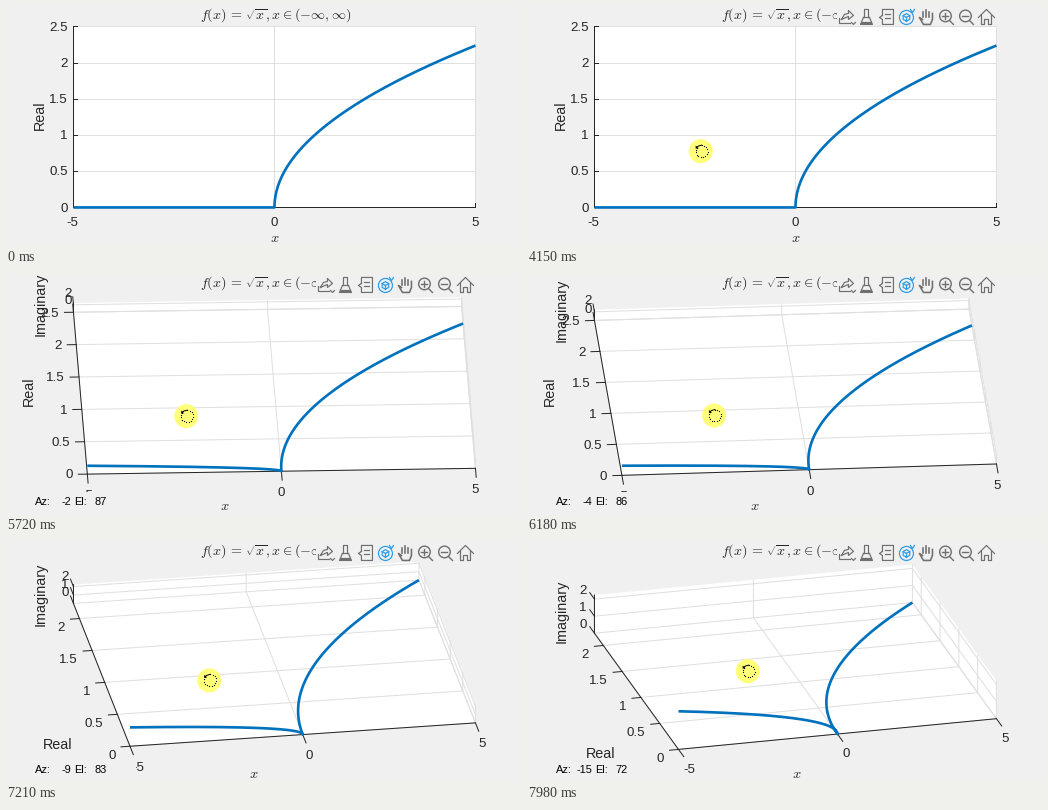
These frames come from a looping animation (515 by 240 pixels, 8 s). A matplotlib script:

```python
import numpy as np
import matplotlib.pyplot as plt
from matplotlib.animation import FuncAnimation
from matplotlib.collections import LineCollection
from matplotlib.patches import Circle, Polygon, Rectangle

W, H = 515, 240
INTERVAL, FRAMES = 40, 200
PX = 0.72                       # points per pixel at 100 dpi
LEFT, SPAN = 67, 402
BG, INK, GRID, BLUE = "#f0f0f0", "#262626", "#dfdfdf", "#0072bd"
ICON, ACTIVE = "#6f6f6f", "#2b9bea"
TICK, LABEL, SMALL = 13.33, 14.4, 11

# The picture refreshes at a slower beat than the animation runs
ENTER, PRESS, READOUT, BEAT = 440, 4150, 4270, 114.24
GRIP = np.array([174.5, 145])   # where the drag begins
MOUSE = np.array([
    (440, 290, 227), (1230, 224, 136), (1810, *GRIP), (5400, *GRIP),
    (5695, 181, 142), (6837, 198, 140.5), (7523, 210, 136), (7980, 221.5, 129)])

U = np.linspace(-1, 1, 241)
CURVE_X = 5 * U * np.abs(U)
ROOT = np.sqrt(CURVE_X + 0j)

plt.rcParams["font.family"] = "Liberation Sans"
plt.rcParams["mathtext.fontset"] = "cm"

fig = plt.figure(figsize=(W / 100, H / 100), dpi=100, facecolor=BG)
ax = fig.add_axes([0, 0, 1, 1])
EDGE = 0.45                     # just under half, so lines snap to whole pixels
ax.set_xlim(-EDGE, W - EDGE)
ax.set_ylim(H - EDGE, -EDGE)
ax.axis("off")


def text(x, y, s, size=TICK, ha="center", color=INK, z=3, drop=0.31):
    """Text whose capitals are centred vertically on y."""
    ax.text(x - 0.6, y + drop * size, s, fontsize=size * PX, ha=ha,
            va="baseline", color=color, zorder=z)


def upright(x, y, s):
    ax.text(x + 0.3 * LABEL, y - 1.5, s, fontsize=LABEL * PX, ha="center",
            va="baseline", rotation=90, rotation_mode="anchor", color=INK, zorder=3)


def line(points, color=INK, width=1, z=1.8, **kw):
    xs, ys = zip(*points)
    ax.plot(xs, ys, color=color, lw=width * PX, zorder=z, **kw)


def projector(az, el, bottom, height, lim):
    """Orthographic view of the unit box, stretched to fill the axes."""
    ca, sa = np.cos(np.radians(az)), np.sin(np.radians(az))
    ce, se = np.cos(np.radians(el)), np.sin(np.radians(el))
    wide, tall = ca - sa, se * (ca - sa) + ce

    def project(x, y, z):
        u, v, w = (x + 5) / 10, y / lim, z / lim
        across = (u * ca + v * sa - sa) / wide
        up = (-u * se * sa + v * se * ca + w * ce) / tall
        return np.array([LEFT + SPAN * across, bottom - height * up])
    return project


def unit(v):
    return v / np.hypot(*v)


def draw_plot(az, el):
    turn = -az
    plane, slanted = turn == 0, turn > 6
    lim = 5 ** 0.5 if turn > 9 else 2.5
    bottom = 201 if plane else 198.5 + 0.57 * turn
    height = 181 if plane else 185 if slanted else 177
    p = projector(az, el, bottom, height, lim)
    xt = (-5, 0, 5)
    yt = np.arange(0, lim + 0.01, 0.5)
    zt = (0, 1, 2) if slanted else (0, 2)

    a, b, c = p(-5, 0, 0), p(5, 0, 0), p(-5, lim, 0)
    roof = p(-5, lim, lim)
    outline = [a, b, p(5, 0, lim), p(5, lim, lim), roof, c]
    ax.add_patch(Polygon(outline, fc="white", ec="none", zorder=1))

    grid = [[p(x, 0, 0), p(x, lim, 0), p(x, lim, lim)] for x in xt]
    grid += [[p(-5, y, 0), p(5, y, 0), p(5, y, lim)] for y in yt]
    if not plane:
        grid += [[p(-5, lim, z), p(5, lim, z), p(5, 0, z)] for z in zt]
    ax.add_collection(LineCollection(grid, colors=GRID, linewidths=PX, zorder=1.5))

    line([b, a, c] if plane else [b, a, c, roof])
    out_x, out_y = unit(a - c), unit(a - b)
    tick = -4 if plane else 9
    for x in xt:
        q = p(x, 0, 0)
        line([q, q + tick * out_x])
        end = q + (2 if plane else 9) * out_x
        text(end[0], end[1] + 12, f"{x}", ha="left" if slanted else "center")
    for y in yt:
        q = p(-5, y, 0)
        line([q, q + tick * out_y])
        end = q + (5 if plane else 14) * out_y
        text(end[0], end[1] + 7.5 * slanted, f"{y:g}", ha="right")
    if not plane:
        for z in zt:
            q = p(-5, lim, z)
            line([q, q - 8 * out_x])
            text(*(q - 12 * out_x), f"{z}", ha="right")
        upright(34, 25 + 3.05 * turn, "Imaginary")

    if slanted:
        text(15 + 4 * turn, 187 + 1.6 * turn, "Real", LABEL)
    else:
        upright(*((33, 110) if plane else (22, 118)), "Real")
    text(268.5 if plane else 211 + 3.95 * turn, 232, "$x$", LABEL, drop=0.22)
    ax.plot(*p(CURVE_X, ROOT.real, ROOT.imag), color=BLUE, lw=2.67 * PX,
            zorder=2, solid_joinstyle="round", solid_capstyle="butt")
    text(270, 7.4, r"$f(x)\,=\,\sqrt{x},x\in(-\infty,\infty)$", 14.1)


def draw_toolbar(alpha):
    ax.add_patch(Rectangle((309.5, -0.5), 160, 20, fc=BG, ec="none",
                           alpha=alpha, zorder=4))
    slots = iter(range(319, 470, 20))

    def icon(*strokes, rings=(), color=ICON, width=1.2):
        x0, y0 = next(slots), 11
        for points in strokes:
            line([(x0 + x, y0 + y) for x, y in points], color, width, 5, alpha=alpha)
        for x, y, r in rings:
            ax.add_patch(Circle((x0 + x, y0 + y), r, fill=False, ec=color,
                                lw=width * PX, alpha=alpha, zorder=5))

    # export, brush, data tip
    icon([(-7, 1), (-7, 6), (4, 6)],
         [(-5, 2), (-2, -3), (2, -4), (2, -7), (7, -2), (2, 2), (2, -1), (-5, 2)],
         [(5, 5), (7, 7), (9, 5)])
    icon([(-2, 0), (-2, -8), (2, -8), (2, 0)], [(-3, 0), (3, 0)],
         [(-3, 0), (-6, 7), (6, 7), (3, 0)], [(-5, 6), (5, 6)], [(-4, 5), (4, 5)])
    icon([(-4, -2), (-4, -8), (7, -8), (7, 7), (-4, 7), (-4, 2), (-7, 0), (-4, -2)],
         [(-1, -3), (4, -3)], [(-1, 1), (4, 1)])
    # rotate, switched on
    angles = np.arange(7) * np.pi / 3
    cube = list(zip(3.8 * np.sin(angles), 3.8 * np.cos(angles)))
    icon(cube, *([(0, 0), cube[k]] for k in (0, 2, 4)), [(4, -8), (6, -5), (8, -8)],
         rings=[(0, 0, 7)], color=ACTIVE)
    # pan
    icon([(-4, 2), (-7, 0), (-3, 7), (4, 7), (6, 2), (6, -4)],
         *([(x, 0), (x, abs(x) / 2 - 7)] for x in (-3, 0, 3)), width=1.6)
    # zoom in and out
    lens = dict(rings=[(-1, -1.5, 5.8)], width=1.4)
    grip, bar = [(3, 3), (7, 7)], [(-4, -1.5), (2, -1.5)]
    icon(grip, bar, [(-1, -4.5), (-1, 1.5)], **lens)
    icon(grip, bar, **lens)
    # home
    icon([(-8, 0), (0, -8), (8, 0)],
         [(-5, -2), (-5, 7), (-2, 7), (-2, 2), (2, 2), (2, 7), (5, 7), (5, -2)])


def draw_cursor(x, y, pressed):
    if pressed:
        ax.add_patch(Circle((x - 1.2, y - 0.3), 12, fc="#ffff7a", ec="none", zorder=6))
    x, y = x - 0.3, y - 0.3
    angle = np.linspace(-0.5, 1.2, 14) * np.pi
    ax.plot(x + 6 * np.cos(angle), y + 6 * np.sin(angle), "s", color="black",
            ms=1.1 * PX, mew=0, zorder=7)
    line([(x, y - 6), (x - 3, y - 5.2), (x - 5, y - 4)], "black", 1, 7)
    ax.add_patch(Polygon([(x - 6, y - 5.5), (x - 6, y - 2.5), (x - 3, y - 3)],
                         fc="black", ec="none", zorder=7))


def draw_angles(az, el):
    ax.add_patch(Rectangle((20, 217.5), 110, 18, fc=BG, ec="none", zorder=4))
    for x, s, ha in ((29.5, "Az:", "left"), (65.5, f"{az:.0f}", "right"),
                     (68.5, "El:", "left"), (101, f"{el:.0f}", "right")):
        text(x, 227, s, SMALL, ha, "black", 5)


def draw(frame):
    for group in (ax.lines, ax.texts, ax.patches, ax.collections):
        for artist in list(group):
            artist.remove()
    now = (frame + 1) * INTERVAL - 1
    t = ENTER + BEAT * np.floor((now - ENTER) / BEAT)
    times, xs, ys = MOUSE.T
    x, y = np.interp(t, times, xs), np.interp(t, times, ys)
    az, el = 0, 90
    if now >= PRESS:            # dragging turns the view
        az, el = 0.315 * (GRIP[0] - x), 90 - 1.1 * (GRIP[1] - y)
    draw_plot(az, el)
    if now >= ENTER:
        draw_toolbar(min(1, 0.25 + (t - ENTER) / 450))
        draw_cursor(x, y, now >= PRESS)
    if now >= READOUT:
        draw_angles(az, el)
    return []


anim = FuncAnimation(fig, draw, frames=FRAMES, interval=INTERVAL,
                     init_func=lambda: [], repeat=True, repeat_delay=0, blit=False)
plt.show()
```
